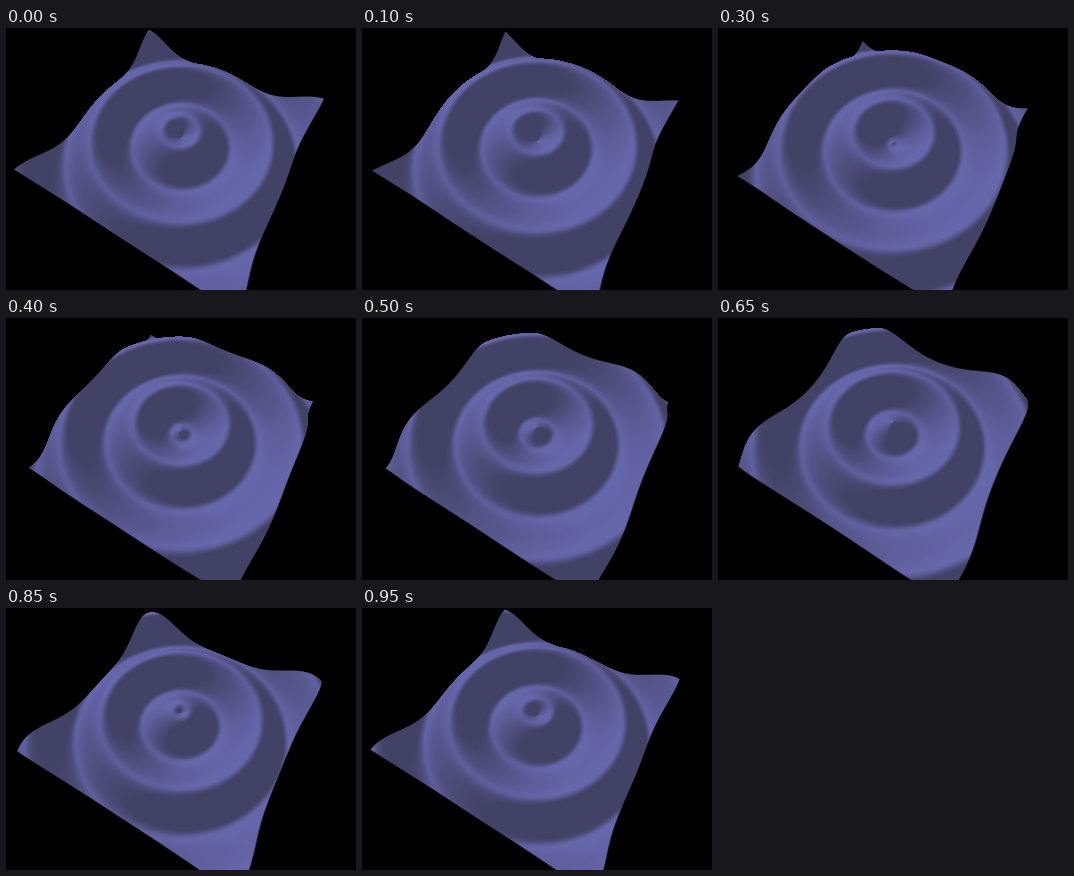
Write an HTML page with a canvas that moves like this. It is 350 px wide and 262 px high and loops after 1000 ms.

```html
<!DOCTYPE html>
<html lang="en">
<head>
<meta charset="utf-8">
<title>Circular wave</title>
<style>
  html, body { margin: 0; width: 100%; height: 100%; overflow: hidden; background: #000; }
  canvas { display: block; width: 350px; height: 262px; }
</style>
</head>
<body>
<canvas id="view" width="350" height="262"></canvas>
<script>
const W = 350, H = 262, LOOP = 1000, STEPS = 20;
const ctx = document.getElementById('view').getContext('2d');
const rad = deg => deg * Math.PI / 180;

// Camera: focal length in pixels, heading, downward pitch, place of the origin in view space
const FOCAL = 227, HEADING = rad(30), PITCH = rad(64.8), DEPTH = 21.1, RISE = 2;
const HALF = 10;                       // the surface spans -HALF..HALF both ways
const AMP = 1.05, LAG = 0.08;
const BUMP = 3;                        // shading normals are steeper than the surface
const DARK = [66, 66, 102], LIT = [102, 102, 171], GAIN = 1.06;

const ch = Math.cos(HEADING), sh = Math.sin(HEADING);
const cp = Math.cos(PITCH), sp = Math.sin(PITCH);
const right = [ch, sh, 0];
const fwd = [-sh * cp, ch * cp, -sp];
const up = [-sh * sp, ch * sp, cp];
const eye = fwd.map((f, i) => -DEPTH * f - RISE * up[i]);

const az = rad(163), el = rad(45);
const sun = [Math.cos(az) * Math.cos(el), Math.sin(az) * Math.cos(el), Math.sin(el)];

// Height field: z = AMP * sin(r - phase)
function render(phase) {
  const img = ctx.createImageData(W, H), px = img.data;
  for (let y = 0, o = 0; y < H; y++) {
    for (let x = 0; x < W; x++, o += 4) {
      px[o + 3] = 255;
      const a = (x + 0.5 - W / 2) / FOCAL, b = (H / 2 - y - 0.5) / FOCAL;
      const dz = -(fwd[2] + a * right[2] + b * up[2]);
      if (dz <= 0) continue;
      // horizontal travel for each unit of descent
      const mu = (fwd[0] + a * right[0] + b * up[0]) / dz;
      const mv = (fwd[1] + a * right[1] + b * up[1]) / dz;
      const pace = 1 / (1 + AMP * Math.hypot(mu, mv));
      let z = AMP, u, v, r;
      for (let i = 0; i < 40; i++) {
        u = eye[0] + mu * (eye[2] - z);
        v = eye[1] + mv * (eye[2] - z);
        r = Math.sqrt(u * u + v * v);
        const gap = z - AMP * Math.sin(r - phase);
        if (gap < 0.004) break;
        z -= gap * pace;
      }
      const inside = HALF - Math.max(Math.abs(u), Math.abs(v));
      const cover = Math.min(1, Math.max(0, 0.5 + inside * 10));
      if (!cover) continue;
      const slope = BUMP * Math.cos(r - phase), k = slope / (r || 1);
      const dot = (sun[2] - k * (u * sun[0] + v * sun[1])) / Math.sqrt(1 + slope * slope);
      const light = Math.min(1, Math.max(0, dot * GAIN));
      for (let c = 0; c < 3; c++) {
        px[o + c] = cover * (DARK[c] + (LIT[c] - DARK[c]) * light);
      }
    }
  }
  return img;
}

const cache = [];
let shown = -1;
const start = performance.now();

function tick() {
  const t = Math.max(0, performance.now() - start) % LOOP;
  const step = Math.floor(t / LOOP * STEPS);
  if (step !== shown) {
    cache[step] = cache[step] || render(2 * Math.PI * step / STEPS + LAG);
    ctx.putImageData(cache[step], 0, 0);
    shown = step;
  }
  requestAnimationFrame(tick);
}
tick();
</script>
</body>
</html>
```
